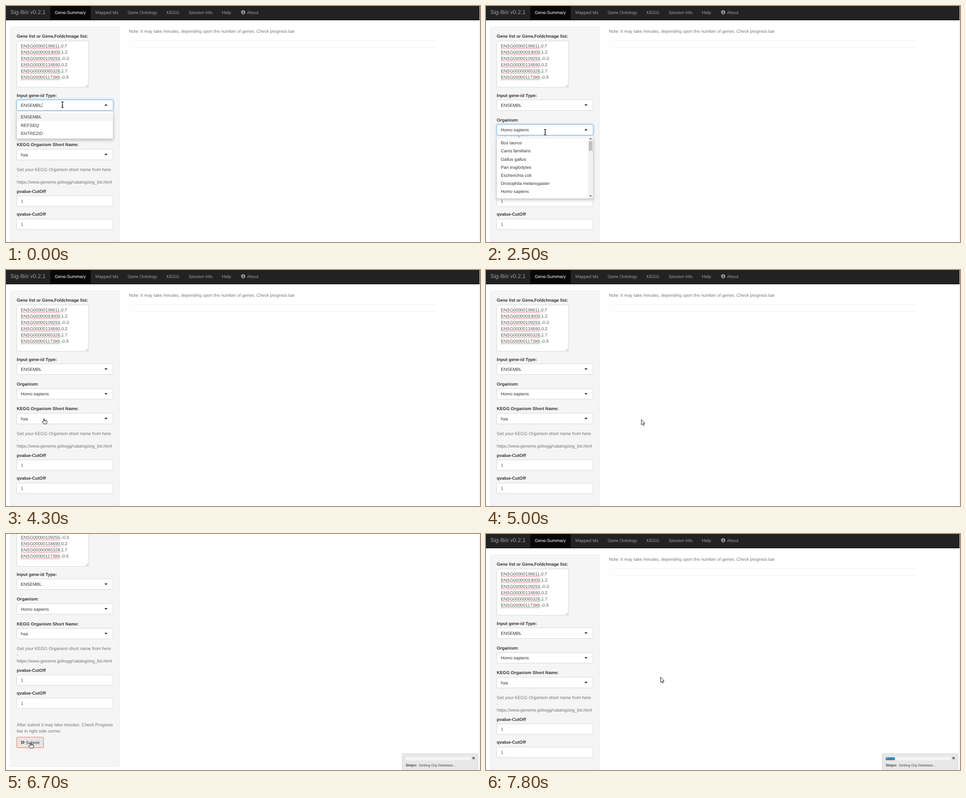
Recreate the animation shown at these times as an HTML page. Size 1058 px wide and 529 px high, loop 8 s.

```html
<!DOCTYPE html>
<html lang="en">
<head>
<meta charset="utf-8">
<title>Gene summary form</title>
<style>
html, body { margin: 0; width: 100%; height: 100%; overflow: hidden; background: #fff; }
svg { display: block; width: 100%; height: 100%; }
text { font-family: "Liberation Sans", Arial, sans-serif; font-size: 9.8px; fill: #333; white-space: pre; text-rendering: geometricPrecision; }
.b { font-weight: 700; }
.help { fill: #737373; }
.val { fill: #555; }
.nav { fill: #9d9d9d; }
.box { fill: #fff; stroke: #ccc; stroke-width: .8; }
.focus { stroke: #66afe9; filter: drop-shadow(0 0 2.4px rgba(82, 168, 236, .75)); }
.drop { filter: drop-shadow(0 3.5px 3.5px rgba(0, 0, 0, .24)); }
</style>
</head>
<body>
<svg id="stage" viewBox="0 0 1058 529" preserveAspectRatio="none"></svg>
<script>
const LOOP = 8000;
const ROW = 18.2;

const text = (x, y, s, cls = '', extra = '') => `<text x="${x}" y="${y}" class="${cls}" ${extra}>${s}</text>`;
const rect = (x, y, w, h, attrs) => `<rect x="${x}" y="${y}" width="${w}" height="${h}" ${attrs}/>`;
const rule = (x, y, w, color = '#eee') => rect(x, y, w, .8, `fill="${color}"`);
const group = (id, body, attrs = '') => `<g id="${id}" ${attrs}>${body}</g>`;

function navbar() {
  const tabs = [[199.5, 'Mapped Ids'], [271.5, 'Gene Ontology'], [358.3, 'KEGG'],
    [407.5, 'Session info'], [482, 'Help'], [537.8, 'About']];
  return rect(0, -10, 1057, 42, 'fill="#222"') + rect(0, 31, 1057, 1, 'fill="#080808"') +
    rect(98.8, -10, 90, 41.5, 'fill="#080808"') +
    text(9.8, 18.3, 'Sig-Bio v0.2.1', 'nav', 'style="font-size:12.6px"') +
    text(109, 17.6, 'Gene-Summary', '', 'style="fill:#fff"') +
    tabs.map(([x, s]) => text(x, 17.6, s, 'nav')).join('') +
    '<circle cx="529.4" cy="14.1" r="4.7" fill="#9d9d9d"/>' +
    '<path d="M528.6 10.9h1.7v1.4h-1.7zM528 13.2h2.3v3.1h.6v1h-2.9v-1h.7v-2.1h-.7z" fill="#222"/>';
}

function geneBox() {
  const genes = ['00000196611,0.7', '00000093009,1.2', '00000109255,-0.3',
    '00000134690,0.2', '00000065328,1.7', '00000117399,-0.5'];
  const lines = genes.map((g, i) => {
    const y = 93.2 + 14 * i;
    return text(33, y, 'ENSG' + g, 'val') +
      `<path d="M33 ${y + 2}H120.4" stroke="#e8474c" stroke-width=".9" stroke-dasharray="1.6 .4"/>`;
  });
  return rect(24, 78.4, 160.6, 104, 'class="box" rx="2.8"') + lines.join('') +
    '<path d="M178 181.2l5.4-5.4M181 181.2l2.4-2.4" stroke="#777" stroke-width=".8"/>';
}

const select = (id, cy, label, value) =>
  text(24, cy - 18.6, label, 'b') +
  rect(24, cy - 11.9, 215, 23.8, `id="${id}Box" class="box" rx="2.8"`) +
  text(33, cy + 3.7, value) +
  `<path id="${id}Arrow" transform="translate(223.2 ${cy - .3})" fill="#333"/>`;

const input = (cy, label) =>
  text(24, cy - 18.9, label, 'b') + rect(24, cy - 11.7, 215, 23.4, 'class="box" rx="2.8"') +
  text(33, cy + 3.7, '1', 'val');

function dropdown(id, cy, items, scroll = 0, bar = false) {
  const top = cy + 13.4;
  const h = bar ? 140.6 : items.length * ROW + 7;
  const first = top + 3.8 - scroll;
  const rows = rect(24.5, first, 214, ROW, 'fill="#f5f5f5"') +
    items.map((s, i) => text(33, first + 12.7 + i * ROW, s)).join('');
  const thumb = top + 10 + scroll / 8;
  const barParts = !bar ? '' : rect(228.2, top, 10.4, h, 'fill="#f1f1f1"') +
    rect(229.2, thumb, 8.4, 21.5, 'fill="#c1c1c1"') +
    `<path d="M230.8 ${top + 7.6}l2.6-3 2.6 3zM230.8 ${top + h - 7.2}l2.6 3 2.6-3z" fill="#505050"/>`;
  return group(id + 'Drop',
    rect(24, top, 215, h, 'class="drop" fill="#fff" stroke="#d0d0d0" stroke-width=".7" rx="1"') +
    `<clipPath id="${id}Clip">${rect(24, top + .4, 215, h - .8, '')}</clipPath>` +
    `<g clip-path="url(#${id}Clip)">${rows}${barParts}</g>`);
}

function submitButton() {
  return rect(24, 565.2, 59.8, 23.6, 'id="button" class="box" rx="2.8"') +
    '<path d="M33.4 573.6l3.2 3.2-3.2 3.2M37.4 573.6l3.2 3.2-3.2 3.2" fill="none" stroke="#333" stroke-width="1.5"/>' +
    text(44.2, 580.4, 'Submit');
}

function form() {
  const organisms = ['Homo sapiens', 'Bos taurus', 'Canis familiaris', 'Gallus gallus', 'Pan troglodytes',
    'Escherichia coli', 'Drosophila melanogaster', 'Homo sapiens', 'Mus musculus', 'Sus scrofa'];
  const codes = ['hsa', 'ptr', 'pps', 'ggo', 'pon', 'nle', 'mcc', 'mcf'];
  return rect(10.2, 46.8, 242.8, 584, 'fill="#f5f5f5" stroke="#e3e3e3" stroke-width=".8" rx="2.8"') +
    text(24, 70.7, 'Gene list or Gene,Foldchnage list:', 'b') + geneBox() +
    select('type', 222.4, 'Input gene-id Type:', 'ENSEMBL') +
    select('org', 277.7, 'Organism:', 'Homo sapiens') +
    select('kegg', 333, 'KEGG Organism Short Name:', 'hsa') +
    text(24, 369.6, 'Get your KEGG Organism short name from here', 'help') +
    text(24, 383.6, '-', 'help') +
    text(24, 397.6, 'https://www.genome.jp/kegg/catalog/org_list.html', 'help') +
    input(437.4, 'pvalue-CutOff') + input(489.2, 'qvalue-CutOff') +
    rule(24, 515, 215) +
    text(24, 540.5, 'After submit it may take minutes. Check Progress', 'help') +
    text(24, 554.5, 'bar in right side cornor', 'help') +
    submitButton() + rule(24, 602, 215) +
    '<path id="caret" d="M80.4 217.3v10.4" stroke="#333" stroke-width=".8"/>' +
    dropdown('type', 222.4, ['ENSEMBL', 'REFSEQ', 'ENTREZID']) +
    dropdown('org', 277.7, organisms, 15.6, true) +
    dropdown('kegg', 333, codes, 0, true);
}

const results = () =>
  text(274.2, 60.4, 'Note: It may take minutes, depending upon the number of genes. Check progress bar', '', 'style="fill:#777"') +
  rule(274, 77.6, 684) + rule(274, 92.2, 684);

const progress = () => group('progress',
  rect(884.4, 492.4, 169, 40, 'fill="#e8e8e8" stroke="#ccc" stroke-width=".8" rx="2"') +
  rect(892, 500.6, 145, 6.4, 'fill="#f5f5f5" rx="2"') +
  rect(892, 500.6, 0, 6.4, 'id="fill" fill="#2d86bf" rx="1.6"') +
  rect(892, 500.6, 0, 6.4, 'id="stripes" fill="url(#stripe)" rx="1.6"') +
  '<path d="M1041.2 499.8l5 5m0-5l-5 5" stroke="#444" stroke-width="1.5"/>' +
  text(892, 521.4, 'Steps:', 'b', 'style="font-size:8.4px;fill:#444"') +
  text(921.8, 521.4, 'Getting Org Database...', '', 'style="font-size:7.75px;fill:#444"'));

const cursors = {
  a: '<path d="M0 0V11.6L2.7 9.2L4.5 13.4L6.5 12.5L4.7 8.4H8Z" fill="#fff" stroke="#111" stroke-width="1" stroke-linejoin="round"/>',
  i: '<path d="M-2.6-6H-.8L0-5.2L.8-6H2.6M0-5V5M-2.6 6H-.8L0 5.2L.8 6H2.6M-1.3 1.4H1.3" fill="none" stroke="#fff" stroke-width="2.8"/>' +
    '<path d="M-2.6-6H-.8L0-5.2L.8-6H2.6M0-5V5M-2.6 6H-.8L0 5.2L.8 6H2.6M-1.3 1.4H1.3" fill="none" stroke="#111" stroke-width="1.3"/>',
  h: '<path d="M-1 6.4V1Q-1 0 0 0T1 1V4.2H4.6Q6.6 4.4 6.6 6.4V9.2L5.6 12H-1L-4 8.2Q-4.4 6.6-3 6.6Z" fill="#fff" stroke="#111" stroke-linejoin="round"/>' +
    '<path d="M1 4.5V6.4M2.9 4.5V6.4M4.8 4.7V6.4" stroke="#111" stroke-width=".7"/>'
};

const stage = document.getElementById('stage');
stage.innerHTML =
  '<defs><pattern id="stripe" width="28" height="28" patternUnits="userSpaceOnUse">' +
  '<path d="M0 28L28 0H14L0 14zM28 28V14L14 28z" fill="#fff" fill-opacity=".15"/></pattern></defs>' +
  rect(0, 0, 1058, 529, 'fill="#fff"') + rect(1056.6, 0, .9, 529, 'fill="#e4e4e4"') +
  group('page', navbar() + form() + results()) + progress() +
  group('cursor', Object.keys(cursors).map(k => group('cur_' + k, cursors[k])).join(''));

const el = {};
stage.querySelectorAll('[id]').forEach(n => { el[n.id] = n; });
const show = (node, on) => node.setAttribute('display', on ? 'inline' : 'none');

// start, number of 100 ms steps, end x, end y, pointer shape
const moves = [
  [0, 1, 126, 221, 'i'], [200, 3, 121, 233, 'i'], [500, 2, 116, 247, 'h'],
  [1000, 1, 116, 248, 'a'], [1100, 1, 113, 260, 'a'], [1200, 2, 108, 282, 'h'], [1400, 1, 107, 298, 'a'],
  [1600, 1, 106, 287, 'i'], [1700, 8, 105, 285, 'i'], [2500, 1, 132, 283, 'i'],
  [3300, 1, 88, 418, 'h'], [3500, 1, 79, 347, 'h'], [3700, 1, 73, 333, 'h'],
  [3900, 1, 78, 335, 'i'], [4100, 1, 84, 334, 'i'], [4300, 1, 85, 333, 'h'],
  [4800, 1, 342, 336, 'a'], [5000, 1, 346.8, 335.2, 'a'], [5600, 1, 293, 334, 'a'],
  [6100, 1, 154.5, 407, 'a'], [6300, 1, 81.5, 438, 'a'], [6500, 1, 53, 465, 'h'],
  [6700, 1, 55, 468, 'h'], [6900, 1, 222, 433, 'a'], [7300, 1, 389.6, 320.8, 'a']
];
const scrolls = [[0, 0], [5400, 32.2], [5600, 109.8], [7600, 32.2], [7800, 0]];
const fills = [[0, 0], [6900, 14], [7300, 21]];

const held = (list, t) => list.filter(k => k[0] <= t).pop()[1];
const within = (t, a, b) => t >= a && t < b;

function pointer(t) {
  let i = moves.length - 1;
  while (moves[i][0] > t) i--;
  const [start, steps, x, y, kind] = moves[i];
  const [, , px, py] = moves[Math.max(0, i - 1)];
  const k = Math.min(1, (Math.floor((t - start) / 100) + 1) / steps);
  return { x: px + (x - px) * k, y: py + (y - py) * k, kind };
}

function setSelect(id, open) {
  show(el[id + 'Drop'], open);
  el[id + 'Box'].classList.toggle('focus', open);
  el[id + 'Arrow'].setAttribute('d', open ? 'M-3.7 1.4L0-2.3L3.7 1.4z' : 'M-3.7-1.5H3.7L0 2.2z');
}

function draw(t) {
  el.page.setAttribute('transform', `translate(0 ${-held(scrolls, t)})`);
  setSelect('type', t < 1000);
  setSelect('org', within(t, 1600, 3300));
  setSelect('kegg', within(t, 3900, 4300) || within(t, 4800, 5000));
  show(el.caret, t < 500);

  const pressed = t >= 6700;
  el.button.style.fill = t >= 6500 ? '#e6e6e6' : '#fff';
  el.button.style.stroke = pressed ? '#ee8f78' : t >= 6500 ? '#adadad' : '#ccc';
  el.button.style.strokeWidth = pressed ? 1.4 : .8;

  show(el.progress, pressed);
  el.fill.setAttribute('width', held(fills, t));
  el.stripes.setAttribute('width', held(fills, t));

  const p = pointer(t);
  el.cursor.setAttribute('transform', `translate(${p.x} ${p.y})`);
  for (const k in cursors) show(el['cur_' + k], k === p.kind);
}

const begin = performance.now();
function tick() {
  draw((performance.now() - begin) % LOOP);
  requestAnimationFrame(tick);
}
tick();
</script>
</body>
</html>
```
